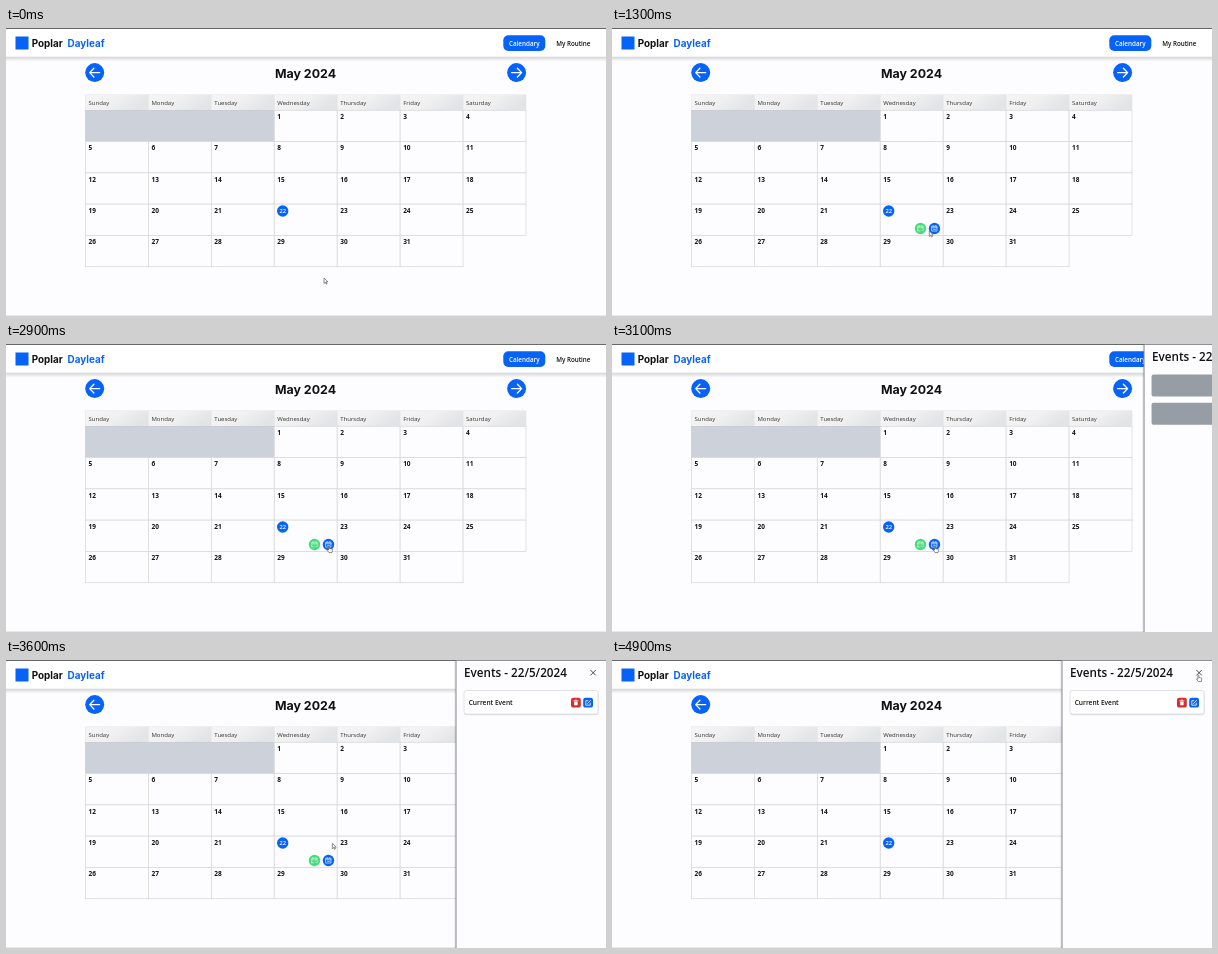
These frames come from a looping animation (600x288 px, 5 s). An HTML page:

```html
<!DOCTYPE html>
<html lang="en">
<head>
<meta charset="utf-8">
<title>Calendar</title>
<style>
  html, body { margin: 0; width: 100%; height: 100%; overflow: hidden; background: #fdfdff; }
  svg { display: block; width: 100vw; height: 100vh; }
  text { font-family: "Open Sans", "Noto Sans", sans-serif; fill: #111; }
  .brand { font-family: Inter, sans-serif; font-weight: 700; }
  .semi { font-weight: 600; }
  .bold { font-weight: 700; }
  .line { fill: none; stroke-linecap: round; stroke-linejoin: round; }
</style>
</head>
<body>
<svg id="stage" viewBox="0 0 600 288">
  <defs>
    <linearGradient id="head" x1="0" y1="0" x2="1" y2="0.35">
      <stop offset="0" stop-color="#f5f5f6"/>
      <stop offset="0.55" stop-color="#f0f0f1"/>
      <stop offset="1" stop-color="#e3e4e6"/>
    </linearGradient>
    <linearGradient id="shade" x1="0" y1="0" x2="0" y2="1">
      <stop offset="0" stop-color="#000" stop-opacity="0.17"/>
      <stop offset="1" stop-color="#000" stop-opacity="0"/>
    </linearGradient>
  </defs>
</svg>
<script>
const LOOP = 5000, STEP = 100;
const BLUE = '#0763f7', GREEN = '#45dc7c', RED = '#d3302f';
const GRID = { x: 79.5, y: 82.3, w: 62.93, h: 31.28 };
const DAYS = ['Sunday', 'Monday', 'Tuesday', 'Wednesday', 'Thursday', 'Friday', 'Saturday'];
const FIRST = 3, LAST = 31, TODAY = 22;
const stage = document.getElementById('stage');

function add(parent, tag, attrs, content) {
  const el = document.createElementNS('http://www.w3.org/2000/svg', tag);
  for (const key in attrs) el.setAttribute(key, attrs[key]);
  if (content !== undefined) el.textContent = content;
  parent.appendChild(el);
  return el;
}
const group = parent => add(parent, 'g', {});
const rect = (p, x, y, width, height, fill, more) =>
  add(p, 'rect', { x, y, width, height, fill, ...more });
const circle = (p, cx, cy, r, fill) => add(p, 'circle', { cx, cy, r, fill });
const label = (p, x, y, size, cls, str, more) =>
  add(p, 'text', { x, y, 'font-size': size, class: cls, ...more }, str);
const stroke = (p, d, color, width) =>
  add(p, 'path', { d, class: 'line', stroke: color, 'stroke-width': width });
const move = (el, x, y) => el.setAttribute('transform', `translate(${x} ${y})`);
const show = (el, on) => el.setAttribute('visibility', on ? 'inherit' : 'hidden');

function cellAt(day) {
  const i = day + FIRST - 1, col = i % 7, row = Math.floor(i / 7);
  return { x: GRID.x + col * GRID.w, y: GRID.y + row * GRID.h, row };
}

function buildHeader() {
  rect(stage, 0, 0, 600, 288, '#fdfdff');
  rect(stage, 0, 28.5, 600, 5, 'url(#shade)');
  rect(stage, 0, 0, 600, 28.5, '#fff');
  rect(stage, 0, 0, 600, 1, '#66686c');
  rect(stage, 0, 287, 600, 1, '#e9e9ec');
  rect(stage, 9.5, 8.5, 13, 13, BLUE);
  label(stage, 25.7, 18.8, 9.9, 'brand', 'Poplar');
  label(stage, 61.6, 18.8, 9.9, 'brand', 'Dayleaf', { style: `fill:${BLUE}` });
  rect(stage, 497.3, 7.2, 42, 15.8, BLUE, { rx: 5 });
  label(stage, 518.3, 17.5, 6.3, 'semi', 'Calendary', { 'text-anchor': 'middle', style: 'fill:#fff' });
  label(stage, 567.3, 17.5, 6.25, 'semi', 'My Routine', { 'text-anchor': 'middle' });
}

function buildCalendar() {
  for (const [x, dir] of [[88.7, -1], [510.6, 1]]) {
    circle(stage, x, 44.6, 9.5, BLUE);
    stroke(stage, `M${x - 5 * dir} 44.6h${10 * dir}m${-4.2 * dir} -4.4l${4.2 * dir} 4.4l${-4.2 * dir} 4.4`, '#fff', 1.3);
  }
  label(stage, 299.5, 49.5, 12.4, 'brand', 'May 2024', { 'text-anchor': 'middle' });

  const line = { stroke: '#d9dadd', 'stroke-width': 0.8 };
  DAYS.forEach((name, i) => {
    const x = GRID.x + i * GRID.w;
    rect(stage, x, 66.8, GRID.w, 15.5, 'url(#head)', { stroke: '#e2e3e5', 'stroke-width': 0.5 });
    label(stage, x + 3, 77, 6, '', name, { style: 'fill:#333' });
  });
  rect(stage, GRID.x, GRID.y, FIRST * GRID.w, GRID.h, '#cdd1d9', { stroke: '#c3c6cc', 'stroke-width': 0.6 });
  for (let day = 1; day <= LAST; day++) {
    const { x, y } = cellAt(day);
    rect(stage, x, y, GRID.w, GRID.h, '#fdfdff', line);
    if (day === TODAY) {
      circle(stage, x + 8.4, y + 6.9, 5.7, BLUE);
      label(stage, x + 8.4, y + 9, 5.8, 'semi', day, { 'text-anchor': 'middle', style: 'fill:#fff' });
    } else {
      label(stage, x + 3, y + 8.8, 6.5, 'bold', day);
    }
  }
}

// Two round buttons, placed around the centre of the blue one
function buildActions() {
  const g = group(stage);
  circle(g, -14, 0, 5.7, GREEN);
  stroke(g, 'M-16.7 2.4v-4.6h5.4v2.3M-16.7 -0.6h5.4M-15.5 -3v1M-12.5 -3v1M-14.5 2.4h-2.2M-13 1.6l1 1l1.6 -1.8', '#d9f8e4', 0.65);
  circle(g, 0, 0, 5.7, BLUE);
  stroke(g, 'M-2.5 -2.1h5v4.7h-5zM-2.5 -0.7h5M-1.3 -3v1M1.3 -3v1M-0.9 1h1.8', '#e3edff', 0.7);
  return g;
}

function buildPanel() {
  const g = group(stage);
  rect(g, -2, 0, 2, 288, '#000', { opacity: 0.05 });
  rect(g, 0, 0, 152, 288, '#fdfdff');
  rect(g, -0.5, 0, 1, 288, '#85878b');
  rect(g, 0, 0, 152, 0.8, '#77797c');
  label(g, 8, 17.4, 11.7, 'semi', 'Events - 22/5/2024');
  stroke(g, 'M134.7 10.3l4.8 4.8m0 -4.8l-4.8 4.8', '#222', 0.8);

  const loading = group(g);
  for (const y of [30.5, 58.8]) rect(loading, 7.5, y, 134.5, 22, '#969da5', { rx: 2 });

  const event = group(g);
  rect(event, 8, 31.2, 134.5, 24, '#000', { rx: 2.5, opacity: 0.1 });
  rect(event, 8, 30.5, 134, 23.6, '#fff', { rx: 2.5, stroke: '#d5d6d9', 'stroke-width': 0.7 });
  label(event, 12.7, 45.1, 6.6, 'semi', 'Current Event');
  rect(event, 115, 37.8, 9.8, 9.8, RED, { rx: 2.2 });
  rect(event, 118.2, 41.6, 3.4, 3.7, '#fff', { rx: 0.5 });
  stroke(event, 'M117.7 40.8h4.4M119.2 40.1h1.4', '#fff', 0.7);
  rect(event, 127.2, 37.8, 9.8, 9.8, BLUE, { rx: 2.2 });
  stroke(event, 'M131.8 40.7h-2v4.5h4.5v-2M131.6 43.5l3 -3.1', '#fff', 0.8);
  return { g, loading, event };
}

function buildCursor() {
  const g = group(stage);
  const look = { fill: '#fff', stroke: '#444', 'stroke-width': 0.6, 'stroke-linejoin': 'round' };
  const arrow = add(g, 'path', { d: 'M0 0v5.4l1.3 -1.2l0.9 1.9l0.9 -0.4l-0.9 -1.9h1.7z', ...look });
  const hand = add(g, 'path', {
    d: 'M-0.5 0.4q0.5 -0.8 1 0v2.1l2.4 0.6q0.6 0.2 0.5 0.9l-0.4 2.6h-3l-1.9 -2.5q0.3 -0.8 1.4 0z', ...look
  });
  return { g, arrow, hand };
}

buildHeader();
buildCalendar();
const actions = buildActions();
const panel = buildPanel();
const cursor = buildCursor();

// time, x, y of the pointer tip
const PATH = [
  [0, 318, 250], [200, 318, 250], [500, 319.5, 226], [700, 319.5, 212.5], [800, 319, 209],
  [900, 318.5, 205.5], [1300, 317.3, 203], [1400, 317, 202.8], [2000, 310.5, 200],
  [2500, 310.5, 200], [2900, 323, 202], [3100, 323, 202], [3600, 326.3, 183.3],
  [4200, 584.5, 16], [4500, 586.4, 15], [4900, 586.4, 15]
];

function pointer(t) {
  const i = PATH.findIndex(k => k[0] >= t);
  if (i < 1) return PATH[0].slice(1);
  const [t0, x0, y0] = PATH[i - 1], [t1, x1, y1] = PATH[i];
  const u = (t - t0) / (t1 - t0), e = u * u * (3 - 2 * u);
  return [x0 + (x1 - x0) * e, y0 + (y1 - y0) * e];
}

function panelLeft(t) {
  if (t <= 3000) return 602;
  const rest = Math.max(0, 1 - (t - 3000) / 384);
  return 450 + 150 * rest * rest;
}

function dayUnder(x, y) {
  const col = Math.floor((x - GRID.x) / GRID.w), row = Math.floor((y - GRID.y) / GRID.h);
  const day = row * 7 + col - FIRST + 1;
  return col >= 0 && col < 7 && row >= 0 && day >= 1 && day <= LAST ? day : 0;
}

function draw(time) {
  const t = Math.floor(time % LOOP / STEP) * STEP;
  const [x, y] = pointer(t), left = panelLeft(t);
  const near = (cx, cy, r) => Math.hypot(x - cx, y - cy) < r;
  let clickable = near(left + 137, 13, 5);

  const day = x < left ? dayUnder(x, y) : 0;
  show(actions, day);
  if (day) {
    const cell = cellAt(day);
    const ax = cell.x + 54.2, ay = cell.y + (cell.row === 4 ? 26.4 : 24.3);
    move(actions, ax, ay);
    clickable = clickable || near(ax, ay, 5) || near(ax - 14, ay, 5);
  }

  show(panel.g, t > 3000);
  move(panel.g, left, 0);
  show(panel.loading, t > 3000 && t < 3300);
  show(panel.event, t >= 3300);

  move(cursor.g, x, y);
  show(cursor.hand, clickable);
  show(cursor.arrow, !clickable);
}

const start = performance.now();
function tick() {
  draw(performance.now() - start);
  requestAnimationFrame(tick);
}
tick();
</script>
</body>
</html>
```
